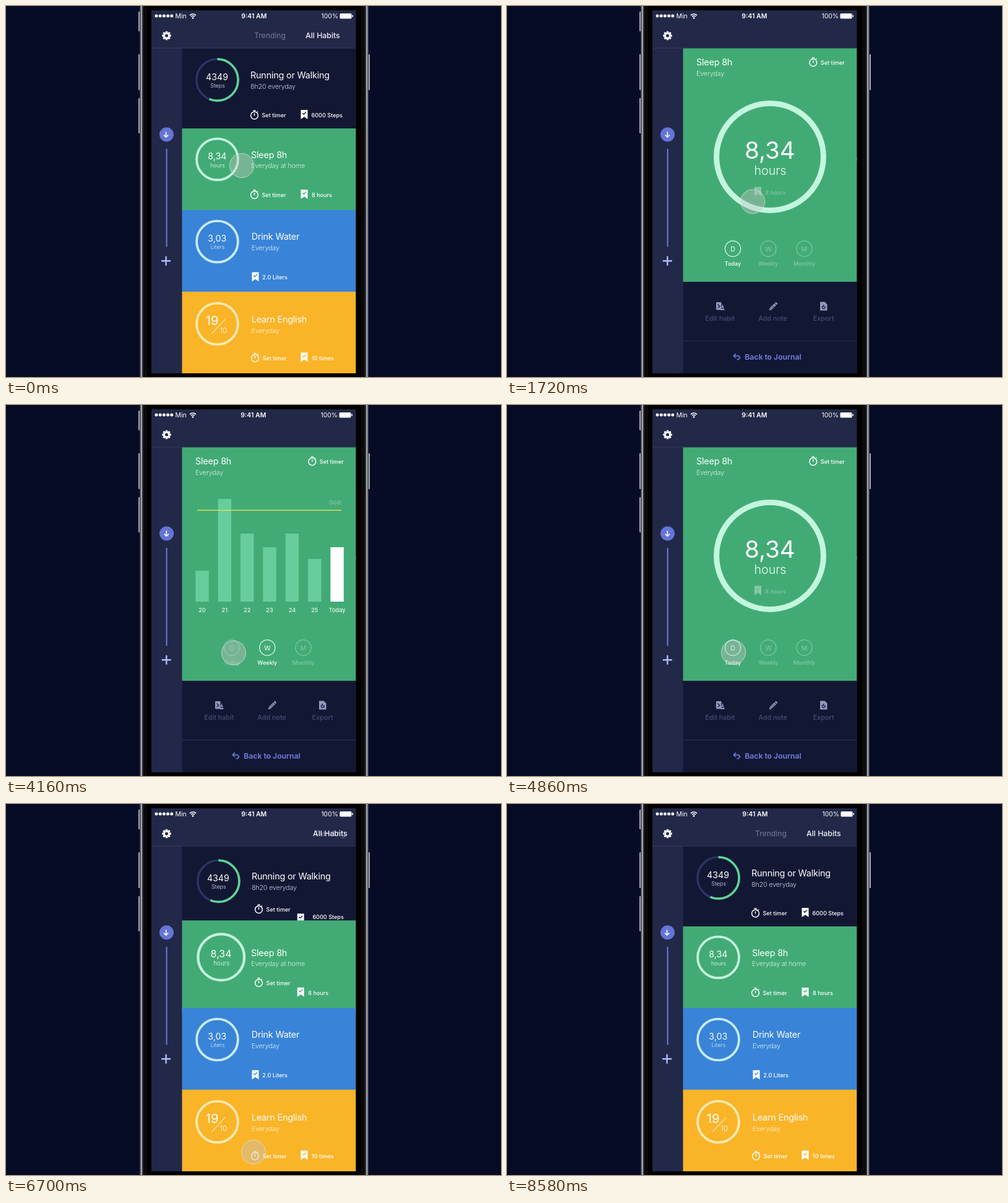
Write an HTML page with a canvas that moves like this. It is 800x600 px and loops after 8.6 s.

```html
<!DOCTYPE html>
<html lang="en">
<head>
<meta charset="utf-8">
<title>Habit tracker</title>
<style>
html, body { margin: 0; width: 100%; height: 100%; overflow: hidden; background: #070c26; }
canvas { display: block; width: 800px; height: 600px; }
</style>
</head>
<body>
<canvas id="stage" width="800" height="600"></canvas>
<script>
const ctx = document.getElementById('stage').getContext('2d');
const LOOP = 8600, OPEN = 895, WEEK = 3000, DAY = 4550, CLOSE = 6501, MOVE = 300;
const DARK = '#121834', SCREEN = '#222848', GREEN = '#42ab75', BLUE = '#3984d8', YELLOW = '#fab428';
const MINT = '#c3f6de';

const clamp = v => Math.max(0, Math.min(1, v));
const lerp = (a, b, p) => a + (b - a) * p;
const smooth = v => v * v * (3 - 2 * v);

// cubic-bezier(.25, .1, .25, 1)
function ease(x) {
  if (x <= 0) return 0;
  if (x >= 1) return 1;
  let lo = 0, hi = 1, s = 0.5;
  for (let i = 0; i < 24; i++) {
    s = (lo + hi) / 2;
    const bx = 0.75 * s * (1 - s) + s * s * s;
    if (bx < x) lo = s; else hi = s;
  }
  return 0.3 * (1 - s) * (1 - s) * s + 3 * (1 - s) * s * s + s * s * s;
}
const after = (t, start) => ease((t - start) / MOVE);

function fade(alpha, draw) {
  if (alpha <= 0) return;
  ctx.save();
  ctx.globalAlpha *= alpha;
  draw();
  ctx.restore();
}

function shifted(x, y, draw) {
  ctx.save();
  ctx.translate(x, y);
  draw();
  ctx.restore();
}

function rect(x, y, w, h, color) {
  ctx.fillStyle = color;
  ctx.fillRect(x, y, w, h);
}

function pill(x, y, w, h, r, color) {
  ctx.fillStyle = color;
  ctx.beginPath();
  ctx.roundRect(x, y, w, h, r);
  ctx.fill();
}

function text(str, x, y, size, weight = 400, color = '#fff', align = 'left', spacing = 0) {
  ctx.font = `${weight} ${size}px Inter, sans-serif`;
  ctx.letterSpacing = spacing + 'px';
  ctx.textAlign = align;
  ctx.fillStyle = color;
  ctx.fillText(str, x, y + size * 0.36);
}
const title = (str, x, y) => text(str, x, y, 14.4, 400, '#fff', 'left', -0.2);
const note = (str, x, y, color) => text(str, x, y, 10.8, 300, color, 'left', -0.2);
const small = (str, x, y, align) => text(str, x, y, 9.1, 500, '#fff', align);

function path(points, color, width, fill) {
  ctx.beginPath();
  for (let i = 0; i < points.length; i += 2) ctx.lineTo(points[i], points[i + 1]);
  if (fill) {
    ctx.fillStyle = color;
    ctx.fill();
  } else {
    ctx.strokeStyle = color;
    ctx.lineWidth = width;
    ctx.stroke();
  }
}

function ring(x, y, r, width, color, from = 0, to = Math.PI * 2) {
  ctx.beginPath();
  ctx.arc(x, y, r, from, to);
  ctx.strokeStyle = color;
  ctx.lineWidth = width;
  ctx.stroke();
}

function disc(x, y, r, color) {
  ctx.beginPath();
  ctx.arc(x, y, r, 0, Math.PI * 2);
  ctx.fillStyle = color;
  ctx.fill();
}

function watch(x, y) {
  shifted(x, y, () => {
    ring(0, 1, 5.9, 1.5, '#fff');
    rect(-2, -7.6, 4, 1.5, '#fff');
    path([0, -2.5, 0, 1.5], '#fff', 1.4);
    path([4.2, -4.2, 5.4, -5.4], '#fff', 1.4);
  });
}

function timer(x, y) {
  watch(x, y);
  small('Set timer', x + 12, y + 1);
}

function bookmark(x, y, back) {
  shifted(x, y, () => {
    path([-5.5, -7.5, 5.5, -7.5, 5.5, 7.5, 0, 3.8, -5.5, 7.5], '#fff', 0, true);
    path([-2.7, -2.3, -0.7, -0.3, 2.8, -4], back, 1.4);
  });
}

function gear(x, y) {
  shifted(x, y, () => {
    for (let i = 0; i < 8; i++) {
      ctx.rotate(Math.PI / 4);
      rect(-1.7, -7.2, 3.4, 4, '#fff');
    }
    ring(0, 0, 3.9, 2.8, '#fff');
  });
}

function phone() {
  rect(0, 0, 800, 600, '#070c26');
  for (const [x, y, h] of [[214, 9, 32], [214, 78, 58], [214, 149, 57], [585.5, 78, 58]])
    pill(x, y, 2.5, h, 1, '#a6a8b0');
  rect(216, 0, 370, 600, '#000');
  for (const flip of [1, -1]) {
    ctx.save();
    if (flip < 0) {
      ctx.translate(802, 0);
      ctx.scale(-1, 1);
    }
    rect(216, 0, 1.5, 600, '#3b3e4a');
    rect(217.5, 0, 2.5, 600, '#a5a7af');
    rect(220, 0, 2, 600, '#2c2d33');
    rect(222, 0, 6, 600, '#0b0b0e');
    ctx.restore();
  }
}

function statusBar(p) {
  for (let i = 0; i < 5; i++) disc(243 + i * 6.2, 16, 2.5, '#fff');
  text('Min', 273.5, 16, 10.5);
  const x = 302, y = 20;
  disc(x, y - 0.6, 1.4, '#fff');
  for (const r of [4, 7]) ring(x, y, r, 1.7, '#fff', -Math.PI * 0.75, -Math.PI * 0.25);
  text('9:41 AM', 400.8 - p, 16, 10.5, 600, '#fff', 'center');
  text('100%', 537 - p, 16, 10.4, 400, '#fff', 'right');
  pill(539.5 - p, 12, 19, 8.5, 1.5, '#fff');
  pill(559.3 - p, 14.5, 1.6, 3.5, 0.8, '#fff');
}

function sidebar(p) {
  const dx = p * 0.7;
  gear(259.5, 48);
  disc(259.5, 207.8, 11.5, '#6574d6');
  shifted(258.6 + dx, 208, () => {
    path([0, -4.5, 0, 4], '#fff', 1.6);
    path([-3.6, 0.6, 0, 4.2, 3.6, 0.6], '#fff', 1.6);
  });
  rect(258.6, 231, 2, 158.5, '#6a7adb');
  shifted(258.6 + dx, 412.3, () => {
    path([-7.5, 0, 7.5, 0], '#b3bbfb', 2.4);
    path([0, -7.5, 0, 7.5], '#b3bbfb', 2.4);
  });
}

function runRow(dx, dy) {
  shifted(dx, dy, () => {
    const top = -Math.PI / 2;
    ring(341.5, 119.5, 33.6, 3.4, '#2c3463');
    ring(341.5, 119.5, 33.6, 3.6, '#5fd394', top, top + Math.PI * 203 / 180);
    text('4349', 341, 114.5, 14.2, 400, '#fff', 'center');
    text('Steps', 342, 128.5, 9, 300, '#dfe2f2', 'center');
    title('Running or Walking', 395, 112);
    note('8h20 everyday', 395, 130, '#c9cde0');
    small('6000 Steps', 493.5, 177);
  });
}

function lowerRows() {
  rect(284.5, 330, 281, 132, BLUE);
  ring(341.5, 381, 33.4, 3.8, '#c8eafb');
  text('3,03', 341.2, 376, 14.2, 400, '#fff', 'center');
  text('Liters', 342, 390, 8.8, 300, '#e3f2fc', 'center');
  title('Drink Water', 396.7, 373);
  note('Everyday', 396.7, 391, '#dcebfa');
  bookmark(403, 438, BLUE);
  small('2.0 Liters', 414.3, 439);

  rect(284.5, 462, 281, 132, YELLOW);
  ring(341.5, 514, 33.4, 3.8, '#fdeab0');
  text('19', 333.3, 508.5, 20.4, 400, '#fff', 'center');
  text('10', 351.3, 525, 11.6, 300, '#fff', 'center');
  path([332.5, 530, 354, 507], '#fdeab0', 1.1);
  title('Learn English', 396.7, 507);
  note('Everyday', 396.7, 525, '#fdf0cf');
  timer(402.5, 568.5);
  bookmark(482, 568, YELLOW);
  small('10 times', 494, 569.5);
}

function bigRing(p, alpha) {
  fade(alpha, () => {
    const x = lerp(341.5, 425, p);
    ring(x, lerp(248, 244, p), lerp(33.4, 86.4, p), lerp(3.8, 9, p), MINT);
    text('8,34', x - 0.2, lerp(243, 233, p), lerp(14.2, 38.5, p), 400, '#fff', 'center');
    text('hours', x + 0.5, lerp(257.3, 265.5, p), lerp(9.1, 19.6, p), 300, '#f0fdf6', 'center');
  });
}

function bars(grow) {
  const tops = [268, 152, 208, 230, 208, 249, 230];
  const names = ['20', '21', '22', '23', '24', '25', 'Today'];
  tops.forEach((top, i) => {
    const x = 306.3 + i * 36.35, h = (318 - top) * grow;
    rect(x, 318 - h, 21.4, h, i === 6 ? '#fff' : '#67cd9c');
    fade(grow, () => text(names[i], x + 10.7, 332, 9.2, 500, '#e2f8ec', 'center'));
  });
  fade(grow, () => {
    rect(309, 169.5, 233, 1.5, '#dbdc57');
    fade(0.38, () => text('Goal', 542, 158, 9.3, 400, '#fff', 'right'));
  });
}

function tabs(week) {
  const list = [['D', 'Today', 365, 1 - week], ['W', 'Weekly', 422.3, week], ['M', 'Monthly', 480.5, 0]];
  for (const [letter, name, x, on] of list)
    fade(lerp(0.36, 1, on), () => {
      ring(x, 392.5, 12.6, 1.3, '#d8f9e8');
      text(letter, x, 393, 10.5, 400, '#fff', 'center');
      small(name, x, 416.5, 'center');
    });
}

function footer(p) {
  const tint = '#9297bd';
  rect(284.5, 541, 281, 1, '#2b3153');
  shifted(0, (1 - p) * 633, () => {
    // edit
    pill(338, 479, 8.5, 12.5, 1, tint);
    path([340.5, 482.5, 344, 486, 340.5, 488.5], DARK, 1.2);
    path([345.5, 492, 348.5, 482, 351.5, 492], tint, 0, true);
    rect(347.3, 488, 2.2, 1.8, DARK);
    // pencil
    path([426.3, 489.7, 433.5, 482.5], tint, 4);
    path([434.2, 481.8, 436, 480], tint, 4);
    path([423.8, 492.3, 424.7, 488.4, 427.7, 491.4], tint, 0, true);
    path([427.5, 488.7, 432, 484.2], DARK, 0.9);
    // export
    path([506, 478.5, 513.5, 478.5, 517.5, 482.5, 517.5, 492.5, 506, 492.5], tint, 0, true);
    ring(511.7, 487, 2.4, 1.3, DARK, -0.6, 4.2);
    path([511.7, 483, 511.7, 487], DARK, 1.2);
    text('Edit habit', 344.3, 505.5, 10.8, 500, '#454b70', 'center');
    text('Add note', 429.6, 505.5, 10.8, 500, '#454b70', 'center');
    text('Export', 511.7, 505.5, 10.8, 500, '#454b70', 'center');
    const link = '#7280e2';
    path([369.8, 562.3, 366.3, 565.8, 369.8, 569.3], link, 1.6);
    path([366.5, 565.8, 374, 565.8, 376.3, 568, 376.3, 569.5, 374, 571.7, 371.5, 571.7], link, 1.6);
    text('Back to Journal', 384.3, 567.2, 12.2, 600, link);
  });
}

function tabsHeader(p, trail) {
  text('Trending', 401 + trail * 172, 48, 12.2, 400, '#767b98');
  text('All Habits', 484 + p * 160, 48, 12.3, 500, '#f0f1f8');
}

const trackKeys = [
  [0, 381, 258], [1250, 381, 258], [2350, 422, 406], [3500, 422, 406], [4160, 368, 401],
  [4300, 366, 400], [5000, 366, 400], [5760, 406, 545], [5950, 400, 563], [LOOP, 400, 563]
];

function touch(t) {
  const i = trackKeys.findIndex(k => k[0] > t) - 1;
  const [ta, xa, ya] = trackKeys[i], [tb, xb, yb] = trackKeys[i + 1];
  const k = smooth((t - ta) / (tb - ta));
  fade(1 - clamp((t - 7100) / 200), () => {
    const x = lerp(xa, xb, k), y = lerp(ya, yb, k);
    disc(x, y, 20, 'rgba(195,195,195,0.4)');
    ring(x, y, 19.5, 1, 'rgba(235,235,235,0.55)');
  });
}

function draw(t) {
  const detail = t >= OPEN && t < CLOSE;
  const p = t < CLOSE ? after(t, OPEN) : 1 - after(t, CLOSE);
  const trail = t < CLOSE ? p : 1 - after(t, CLOSE + 121);
  const week = after(t, WEEK) - after(t, DAY);

  phone();
  ctx.save();
  ctx.beginPath();
  ctx.rect(235, 7, 330.5, 587);
  ctx.clip();
  rect(235, 7, 331, 587, SCREEN);
  rect(235, 67.5, 331, 1, '#373d5d');
  statusBar(p);
  sidebar(p);
  tabsHeader(p, trail);

  rect(284.5, 68.5, 281, lerp(198, 594, p) - 68.5, DARK);
  runRow(p * 25, p * 70);
  const markX = lerp(482, 405.5, p), timerX = lerp(401.5, 494.8, p);
  const dim = 1 - 0.65 * p;
  if (!detail) {
    timer(timerX, lerp(176, 90.5, p));
    fade(dim, () => bookmark(markX, lerp(175.5, 300, p), DARK));
  }
  if (detail) footer(p);

  const top = lerp(198, 68.5, p);
  rect(284.5, top, 281, lerp(330, 446, p) - top, GREEN);
  bigRing(p, 1 - week);
  if (week > 0) bars(week);
  if (detail) {
    title('Sleep 8h', 306, 91);
    note('Everyday', 306, 109, '#d5f0e1');
    tabs(week);
  } else {
    title('Sleep 8h', 396, 240.5);
    note('Everyday at home', 396, 258.5, '#d5f0e1');
  }
  timer(timerX, lerp(detail ? 176 : 304.5, 90.5, p));
  fade(dim * (1 - week), () => {
    bookmark(markX, lerp(detail ? 175.5 : 304.5, 300, p), GREEN);
    small('8 hours', lerp(494, 417.5, p), lerp(306, 301.5, p));
  });
  if (!detail) lowerRows();
  touch(t);
  ctx.restore();
}

const began = performance.now();
function frame(now) {
  draw(Math.max(0, now - began) % LOOP);
  requestAnimationFrame(frame);
}
draw(0);
requestAnimationFrame(frame);
</script>
</body>
</html>
```
